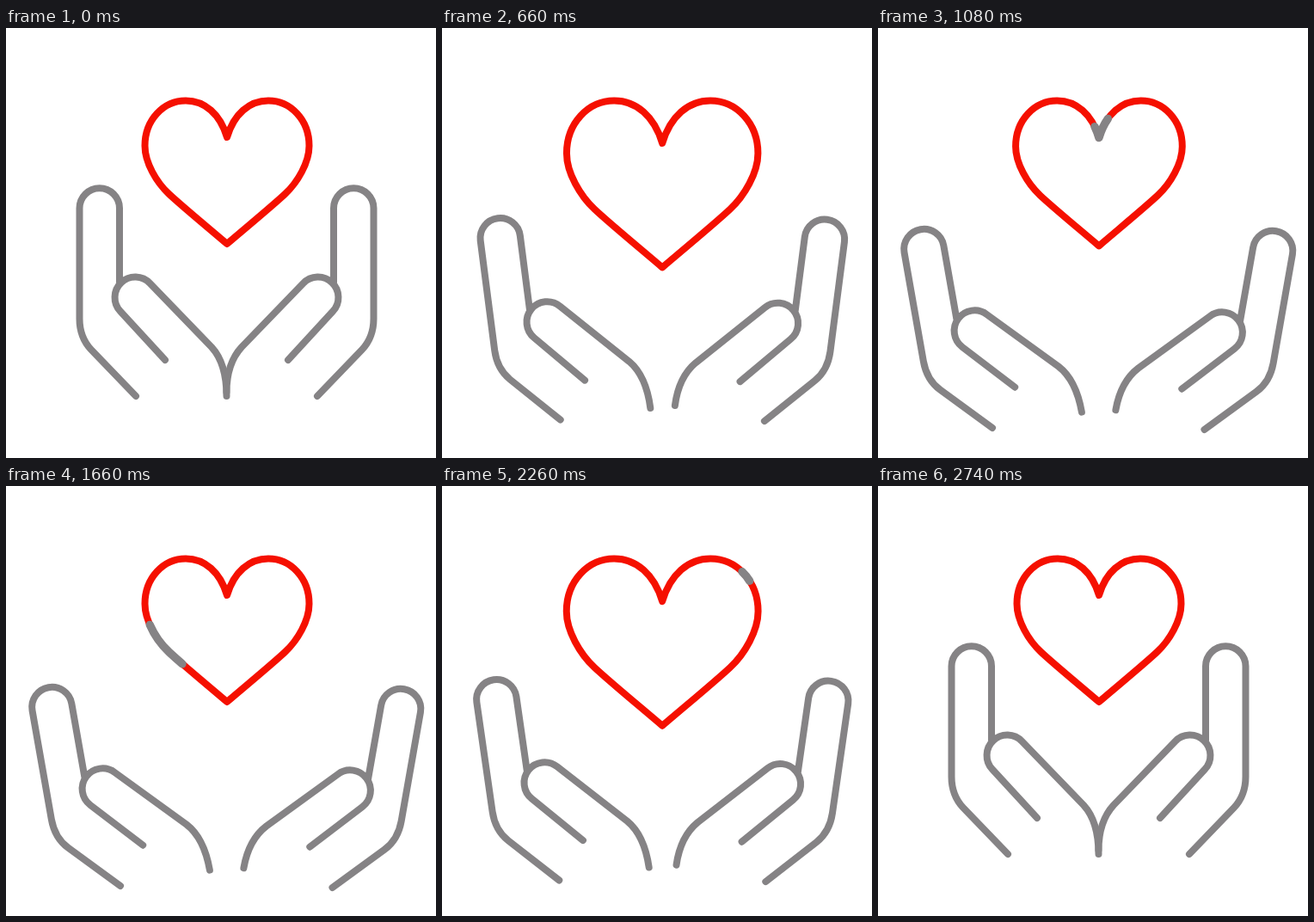
Animation of 500 by 500 pixels, one loop 3 s. Source, as an HTML page:

```html
<!DOCTYPE html>
<html lang="en">
<head>
<meta charset="utf-8">
<title>Heart and hands</title>
<style>
  html, body { margin: 0; width: 100%; height: 100%; overflow: hidden; background: #fff; }
  svg { display: block; width: 100vw; height: 100vh; }
  path { fill: none; stroke-width: 8; stroke-linecap: round; stroke-linejoin: round; }
  .hand, #dash { stroke: #858385; }
  #outline { stroke: #f51000; }
</style>
</head>
<body>
<svg viewBox="0 0 500 500">
  <g id="left"><path class="hand"/></g>
  <g transform="translate(513 0) scale(-1 1)">
    <g id="right"><path class="hand"/></g>
  </g>
  <g id="heart">
    <path id="outline"/>
    <path id="dash" pathLength="100"/>
  </g>
</svg>
<script>
const LOOP = 3000, STEP = 20;
const $ = id => document.getElementById(id);

const heartPath = `M257 127 C265 100 283 84.5 305 84.5 C331 84.5 352.5 107 352.5 137
  C352.5 156.5 339 179.5 324.5 193 C309 207.5 278 233 257 251
  C236 233 205 207.5 189.5 193 C175 179.5 161.5 156.5 161.5 137
  C161.5 107 183 84.5 209 84.5 C231 84.5 249 100 257 127 Z`;

// Finger and palm edge, then thumb running into the wrist.
const handPath = wristY => `M151 428 L99 374 C90.5 365 85.5 352 85.5 338 V209.5
  A23.25 23.25 0 0 1 132 209.5 V296
  M185 386 L133 329.5 A23.5 23.5 0 0 1 167.5 297 L239 371
  C250 383 256.5 400 256.5 ${wristY}`;

$('outline').setAttribute('d', heartPath);
$('dash').setAttribute('d', heartPath);
$('left').firstElementChild.setAttribute('d', handPath(428));
$('right').firstElementChild.setAttribute('d', handPath(423.5));

// Smooth 0..1 ramp between two times.
function ramp(t, from, to) {
  const u = Math.min(1, Math.max(0, (t - from) / (to - from)));
  return u * u * (3 - 2 * u);
}

function poseHand(id, open, dx, dy) {
  $(id).setAttribute('transform',
    `translate(${170 + dx * open} ${307 + dy * open}) rotate(${-10 * open}) translate(-170 -307)`);
}

// The line keeps its weight while the heart grows.
function poseHeart(scale) {
  $('heart').setAttribute('transform',
    `translate(262 84.5) scale(${scale}) translate(-262 -84.5)`);
  $('outline').style.strokeWidth = 8 / scale;
  $('dash').style.strokeWidth = 9.4 / scale;
}

function poseDash(tail, head) {
  const length = head - tail;
  const dash = $('dash');
  dash.style.display = length > 0.1 ? '' : 'none';
  dash.setAttribute('stroke-dasharray', `${length} ${100 - length}`);
  dash.setAttribute('stroke-dashoffset', 100 - ((tail + 100) % 100));
}

function render(t) {
  const open = ramp(t, 185, 900) - ramp(t, 2080, 2740);
  poseHand('left', open, -39.3, 35.5);
  poseHand('right', open, -38.8, 37.5);

  const beat = ramp(t, 170, 750) - ramp(t, 750, 1150)
             + ramp(t, 1770, 2340) - ramp(t, 2340, 2740);
  poseHeart(1 + 0.176 * beat);

  const along = delay => -12 + 131.5 * ramp(t, 740 + delay, 2300 + delay);
  poseDash(along(80), along(0));
}

function tick(now) {
  render(Math.floor((now % LOOP) / STEP) * STEP);
  requestAnimationFrame(tick);
}
render(0);
requestAnimationFrame(tick);
</script>
</body>
</html>
```
